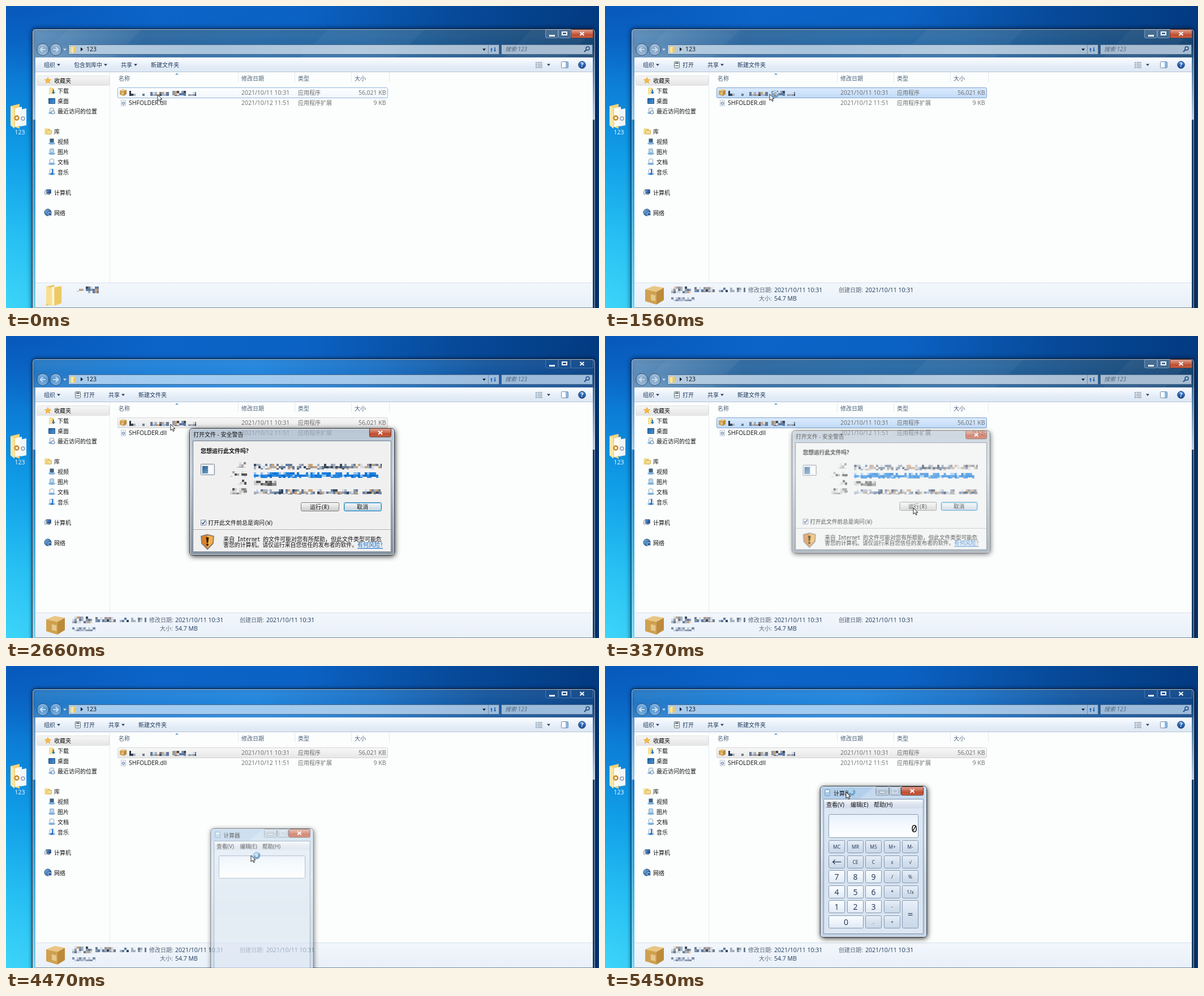
An HTML page with a canvas for the animation above (5520 ms loop, 1048 by 534 pixels).

```html
<!DOCTYPE html>
<html lang="zh">
<head>
<meta charset="utf-8">
<style>
html, body { margin: 0; width: 100%; height: 100%; overflow: hidden; }
canvas { display: block; }
</style>
</head>
<body>
<canvas id="stage" width="1048" height="534"></canvas>
<script>
const LOOP = 5520;
const stage = document.getElementById('stage').getContext('2d');
let g = stage;

const clamp = v => Math.max(0, Math.min(1, v));
const ramp = (t, a, b) => clamp((t - a) / (b - a));
const ease = p => p * p * (3 - 2 * p);
const noise = n => { const v = Math.sin(n * 127.1) * 43758.5453; return v - Math.floor(v); };

// ---- drawing helpers ----
function grad(x0, y0, x1, y1, ...colors) {
  const lg = g.createLinearGradient(x0, y0, x1, y1);
  colors.forEach((c, i) => lg.addColorStop(i / (colors.length - 1), c));
  return lg;
}
const down = (y, h, ...colors) => grad(0, y, 0, y + h, ...colors);

function rect(x, y, w, h, fill) { g.fillStyle = fill; g.fillRect(x, y, w, h); }

function box(x, y, w, h, r, fill, line) {
  g.beginPath();
  g.roundRect(x + .5, y + .5, w - 1, h - 1, r);
  if (fill) { g.fillStyle = fill; g.fill(); }
  if (line) { g.strokeStyle = line; g.lineWidth = 1; g.stroke(); }
}

function poly(points, fill, line, width = 1) {
  g.beginPath();
  for (let i = 0; i < points.length; i += 2) g.lineTo(points[i], points[i + 1]);
  if (fill) { g.closePath(); g.fillStyle = fill; g.fill(); }
  if (line) { g.strokeStyle = line; g.lineWidth = width; g.stroke(); }
}

function disc(x, y, r, fill, line, width = 1) {
  g.beginPath();
  g.arc(x, y, r, 0, 7);
  if (fill) { g.fillStyle = fill; g.fill(); }
  if (line) { g.strokeStyle = line; g.lineWidth = width; g.stroke(); }
}

const SANS = "'Open Sans','Noto Sans CJK SC',sans-serif";
const MONO = "'Noto Sans Mono CJK SC','Noto Sans CJK SC',monospace";
function text(s, x, y, color = '#111', { size, style = '', family = SANS, align = 'left' } = {}) {
  size ??= /[\u4e00-\u9fff]/.test(s) ? 10 : 10.5;
  g.font = `${style} ${size}px ${family}`;
  g.textAlign = align;
  g.fillStyle = color;
  g.fillText(s, x, y);
}

const INK = ['#39485c', '#6d7b8e', '#a5b2c1', '#c9a27c', '#5f7ba4', '#d5dbe2', '#8f98a6'];
const BLUES = ['#0a6fd0', '#1b7fdc', '#2f8ae0', '#8cc0f0'];
const GRAYS = ['#555', '#888', '#aaa', '#ccc', '#ddd'];
// Pixelated words: the middle rows are denser than the outer ones.
function mosaic(x, y, w, h, seed, colors = INK, fill = .75) {
  for (let j = 0; j < h; j += 4) {
    const density = j > 0 && j + 4 < h ? Math.min(1, fill * 1.3) : fill * .85;
    for (let i = 0; i < w; i += 4) {
      const n = seed + i * 3.7 + j * 11.3;
      if (noise(n) < density)
        rect(x + i, y + j, Math.min(4, w - i), Math.min(4, h - j), colors[Math.floor(noise(n + .5) * colors.length)]);
    }
  }
}

const triangle = (x, y, c = '#1e395b') => poly([x - 3, y - 1.5, x + 3, y - 1.5, x, y + 2], c);

// ---- icons ----
function folder(x, y, w, h) {
  poly([x, y + h * .08, x + w * .45, y, x + w * .5, y + h * .9, x, y + h], '#e9c766');
  poly([x + w * .3, y + h * .1, x + w * .8, y + h * .06, x + w * .8, y + h * .9, x + w * .3, y + h], '#fff4cf');
  poly([x + w * .45, y + h * .12, x + w * .85, y + h * .06, x + w * .85, y + h * .88, x + w * .45, y + h], '#edc965');
  poly([x, y + h * .08, x + w * .3, y + h * .14, x + w * .33, y + h, x, y + h * .9], '#f8df93');
}

function carton(x, y, s) {
  poly([x, y + s * .18, x + s * .45, y, x + s, y + s * .1, x + s * .6, y + s * .32], '#e9c684');
  poly([x, y + s * .18, x + s * .6, y + s * .32, x + s * .6, y + s, x, y + s * .82], '#cfa04e');
  poly([x + s * .6, y + s * .32, x + s, y + s * .1, x + s, y + s * .76, x + s * .6, y + s], '#bd8a3a');
  poly([x + s * .3, y + s * .45, x + s * .55, y + s * .5, x + s * .55, y + s * .82, x + s * .3, y + s * .76], '#e6c98c');
}

function star(x, y, r) {
  const p = [];
  for (let i = 0; i < 10; i++) {
    const a = i * Math.PI / 5 - Math.PI / 2, d = i % 2 ? r * .45 : r;
    p.push(x + d * Math.cos(a), y + d * Math.sin(a));
  }
  poly(p, '#f6b93f', '#e09a2a', .6);
}

function monitor(x, y) {
  box(x + 2, y, 10, 8, 1, grad(x, y, x + 10, y + 8, '#7cc4f2', '#143d86'), '#5a6b80');
  rect(x + 5, y + 8, 5, 2, '#9aa6b4');
  box(x, y + 2, 4, 8, 1, '#dfe6ee', '#8794a4');
}

function media(x, y, color) {
  box(x + 2, y, 8, 8, 1, color, '#8fa2b6');
  g.beginPath();
  g.ellipse(x + 6, y + 9, 6, 2, 0, 0, 7);
  g.fillStyle = '#7fb2de';
  g.fill();
}

function arrow(x, y) {
  poly([x, y, x, y + 11, x + 2.6, y + 8.6, x + 4.6, y + 12.6, x + 6.3, y + 11.8, x + 4.5, y + 8, x + 8, y + 8, x, y], '#fff', '#222', 1);
}

function busyRing(x, y, t) {
  disc(x, y, 4.6, null, '#6fa3cc', 3.6);
  g.beginPath();
  const a = t / 1000 * 2 * Math.PI;
  g.arc(x, y, 4.6, a, a + 2.6);
  g.strokeStyle = '#c4e2f4';
  g.lineWidth = 2.4;
  g.stroke();
}

function closeButton(x, y, w, h, lit = true) {
  box(x, y, w, h, 2, lit ? down(y, h, '#dfa898', '#d07c66', '#bd4a2e', '#cc6e50') : null, lit ? '#63352e' : 'rgba(255,255,255,.22)');
  const cx = x + w / 2, cy = y + h / 2;
  for (const s of [-1, 1]) poly([cx - 3.5, cy - 3 * s, cx + 3.5, cy + 3 * s], null, '#fff', 2);
}

// ---- desktop and explorer ----
function desktop() {
  rect(0, 0, 1048, 534, grad(0, 0, 1048, 90, '#0757b8', '#0c64c8', '#0b62c4', '#074a9a', '#033a80'));
  const glow = g.createRadialGradient(-20, 570, 20, -20, 570, 590);
  ['#42d8fa', '#27c0f3', '#109ee8', '#0c7ad4', 'rgba(10,96,196,0)'].forEach((c, i) => glow.addColorStop(i / 4, c));
  rect(0, 0, 500, 534, glow);
  poly([8, 177, 24, 173, 24, 217, 8, 211], '#f3d27c');
  poly([16, 181, 28, 178, 28, 211, 16, 214], '#fbfaf4');
  poly([25, 183, 36, 181, 36, 211, 25, 213], '#f2f5f8');
  poly([8, 177, 14, 180, 15, 217, 8, 211], '#fae6a6');
  disc(19, 198, 3.5, null, '#c9882a', 2.5);
  disc(30, 199, 3, null, '#8a9bb0', 1.5);
  text('123', 24.5, 227, '#fff', { align: 'center' });
}

function windowFrame(active) {
  g.save();
  g.shadowColor = 'rgba(0,10,30,.7)';
  g.shadowBlur = active ? 9 : 6;
  box(46, 40, 996, 520, 6, active
    ? grad(46, 0, 1042, 0, '#5f8fbb', '#2d689f', '#2a6ba6', '#2566a0', '#1d5388', '#164573')
    : grad(46, 0, 1042, 0, '#2478c4', '#1f80d8', '#2285dc', '#1c72c6', '#14569e', '#104688'), '#10243c');
  g.restore();
  if (active) {
    g.save();
    g.beginPath();
    g.rect(47, 41, 994, 50);
    g.clip();
    for (const [x, w] of [[60, 130], [520, 170], [880, 110]])
      poly([x, 91, x + 50, 41, x + 50 + w, 41, x + w, 91], 'rgba(255,255,255,.04)');
    g.restore();
  }
  rect(47, 41, 994, 50, down(41, 50, 'rgba(255,255,255,.06)', 'rgba(255,255,255,0)', 'rgba(255,255,255,.1)'));
  rect(47, 91, 5, 110, down(91, 110, '#5c97cc', '#9cc6e8'));
  rect(47, 201, 5, 333, down(201, 333, '#1d79c2', '#3fa8dc', '#78d6f2'));
  rect(1037, 91, 4, 110, down(91, 110, '#3d6ea0', '#b9cde0'));
  rect(1037, 201, 4, 333, '#153f6a');
  box(47, 41, 994, 520, 5, null, 'rgba(255,255,255,.55)');

  for (const [x, w] of [[953, 23], [976, 22]])
    box(x, 41, w, 16, 2, active ? 'rgba(255,255,255,.13)' : null, `rgba(220,235,250,${active ? .4 : .22})`);
  rect(960, 51, 10, 3, '#fff');
  g.strokeStyle = '#fff';
  g.lineWidth = 2;
  g.strokeRect(983, 46, 8, 5);
  closeButton(998, 41, 40, 16, active);

  for (const x of [65, 88]) {
    disc(x, 77, 10.5, down(66, 21, 'rgba(255,255,255,.5)', 'rgba(255,255,255,.18)', 'rgba(255,255,255,.35)'), 'rgba(20,50,90,.7)');
    const d = x < 70 ? -1 : 1;
    poly([x - 5 * d, 77, x + 4 * d, 77], null, '#c9dcee', 2);
    poly([x, 73, x + 4.5 * d, 77, x, 81], null, '#c9dcee', 2);
  }
  triangle(104, 77, '#cfe0ef');
  const bar = active ? ['#b4cbe0', '#a9c4dc', '#b5cbdf', '#a8bdd2'] : ['#a6cbee', '#a2ccf2', '#a5c9ea', '#9dbcdc'];
  box(110, 68, 762, 18, 1, grad(110, 0, 872, 0, ...bar), '#47698c');
  box(875, 68, 162, 18, 1, active ? '#a8bdd2' : '#9dbcdc', '#47698c');
  rect(852, 69, 1, 16, '#6f8fae');
  folder(114, 71, 11, 12);
  poly([132, 73, 136, 76.5, 132, 80], '#111');
  text('123', 142, 80);
  triangle(845, 77, '#111');
  poly([856, 77, 858, 74, 860, 77], '#1a5fae');
  poly([858, 75, 858, 81], null, '#1a5fae', 1.5);
  poly([862, 78, 864, 81, 866, 78], '#1a5fae');
  poly([864, 73, 864, 79], null, '#1a5fae', 1.5);
  text('搜索 123', 882, 80, '#53677c', { style: 'italic' });
  disc(1028, 75, 3, null, '#204a82', 1.4);
  poly([1026, 77, 1022, 81], null, '#204a82', 2);
}

function toolbar(selected) {
  rect(52, 91, 985, 26, down(91, 26, '#fdfeff', '#eef4fb', '#e2ebf6', '#dde8f4'));
  rect(52, 116, 985, 1, '#b4c3d5');
  const item = (s, x, arrowX) => { text(s, x, 108, '#1e395b'); if (arrowX) triangle(arrowX, 104); };
  item('组织', 67, 93);
  if (selected) {
    box(122, 98, 10, 12, 1, '#fff', '#566');
    rect(124, 100, 6, 2, '#456');
    rect(124, 104, 6, 3, '#9ab');
    item('打开', 137);
    item('共享', 181, 207);
    item('新建文件夹', 234);
  } else {
    item('包含到库中', 120, 176);
    item('共享', 203, 229);
    item('新建文件夹', 256);
  }
  for (let i = 0; i < 4; i++) {
    rect(936, 99 + i * 3, 2, 2, '#7f9dba');
    rect(939, 99 + i * 3, 9, 1.5, '#98a4b2');
  }
  triangle(959, 104);
  box(981, 98, 13, 12, 1, '#fff', '#6d8cad');
  rect(989, 99, 4, 10, '#8db8e0');
  disc(1018, 104, 6.3, down(98, 12, '#4a8fd8', '#123f8c'), '#24487c');
  text('?', 1018, 108, '#fff', { style: 'bold', align: 'center' });
}

function navigation() {
  rect(183, 117, 1, 373, '#e3eaf2');
  box(54, 123, 129, 18, 2, down(123, 18, '#f7f7f7', '#e4e4e4'), '#e0e0e0');
  [['收藏夹', 85, 132], ['下载', 91, 150], ['桌面', 91, 168], ['最近访问的位置', 91, 186],
   ['库', 85, 222], ['视频', 91, 240], ['图片', 91, 258], ['文档', 91, 276], ['音乐', 91, 294],
   ['计算机', 85, 330], ['网络', 85, 366]].forEach(([s, x, y]) => text(s, x, y + 4));
  star(74, 132, 6);
  folder(76, 144, 10, 12);
  poly([81, 152, 87, 152, 84, 156], '#2678c8');
  rect(83, 148, 2, 4, '#2678c8');
  box(75, 163, 12, 10, 0, grad(75, 163, 87, 173, '#1d5ba8', '#4aa0dc'), '#2a4d78');
  media(75, 180, '#eef3f8');
  disc(83, 188, 3, '#e4edf5', '#6c88a8');
  folder(68, 216, 11, 11);
  box(71, 219, 10, 8, 1, '#f3dc92', '#d0a94c');
  media(75, 234, '#41637f');
  media(75, 252, '#b4d6ef');
  media(75, 270, '#fafcff');
  media(75, 288, '#fff');
  poly([82, 288, 82, 297, 79, 297], null, '#1a6cc4', 2);
  monitor(68, 324);
  disc(74, 365, 6, grad(68, 360, 80, 370, '#7fbcf0', '#16427f'), '#24466f');
  box(74, 365, 7, 6, 1, '#2f62a8', '#cfdbe8');
}

function fileList(row) {
  [['名称', 199], ['修改日期', 416], ['类型', 516], ['大小', 616]].forEach(([s, x]) => text(s, x, 132, '#4c607a'));
  for (const x of [410, 510, 610, 677]) rect(x, 117, 1, 18, '#e2e8f0');
  poly([299, 121.5, 302, 118.5, 305, 121.5], '#5f9ac8');
  const look = {
    hover: ['#fdfeff', '#f1f7fd', '#8fb6dc'],
    selected: ['#dcebfc', '#c0daf9', '#7da2ce'],
    idle: ['#f8f8f8', '#e6e6e6', '#d6d6d6']
  }[row];
  box(197, 144, 478, 19, 2, down(144, 19, look[0], look[1]), look[2]);
  carton(201, 147, 12);
  rect(218, 150, 3, 9, '#2a3848');
  mosaic(221, 155, 27, 4, 8, INK, .7);
  mosaic(255, 152, 33, 7, 21, INK, .9);
  mosaic(294, 150, 24, 9, 34, INK, .9);
  mosaic(322, 152, 14, 7, 55, INK, .9);
  box(203, 166, 9, 11, 0, '#fafcff', '#b9c4d0');
  disc(207.5, 172, 2, null, '#7a92b8', 1.5);
  text('SHFOLDER.dll', 217, 175);
  const gray = '#6d6d6d';
  [[157, '2021/10/11 10:31', '应用程序', '56,021 KB'], [175, '2021/10/12 11:51', '应用程序扩展', '9 KB']].forEach(([y, date, type, size]) => {
    text(date, 416, y, gray);
    text(type, 516, y, gray);
    text(size, 671.5, y, gray, { align: 'right' });
  });
}

function details(selected) {
  rect(52, 489, 985, 45, down(489, 45, '#f3f7fc', '#edf3fa', '#e9f0f8'));
  rect(52, 489, 985, 1, '#d5e0ec');
  rect(52, 533, 985, 1, '#6f8ba8');
  if (!selected) {
    folder(71, 493, 32, 37);
    mosaic(121, 500, 20, 5, 71, INK, .35);
    mosaic(141, 496, 23, 12, 12, INK, .75);
    return;
  }
  carton(71, 495, 33);
  mosaic(117, 496, 35, 12, 3, INK, .65);
  mosaic(158, 497, 36, 9, 43, INK, .75);
  mosaic(201, 498, 47, 8, 66, INK, .75);
  mosaic(117, 515, 41, 7, 91, ['#8f9db2', '#a9b5c8', '#7c8ca8', '#c2ccd9'], 1);
  const label = '#5a6779', value = '#1e395b';
  text('修改日期:', 253, 506, label);
  text('2021/10/11 10:31', 299, 506, value);
  text('创建日期:', 413, 506, label);
  text('2021/10/11 10:31', 460, 506, value);
  text('大小:', 272, 521, label);
  text('54.7 MB', 299, 521, value);
}

// ---- popup windows, painted once ----
const PAD = 14;
function layer(w, h, paint) {
  const c = document.createElement('canvas');
  c.width = w + 2 * PAD;
  c.height = h + 2 * PAD;
  g = c.getContext('2d');
  g.translate(PAD, PAD);
  paint(w, h);
  g = stage;
  return c;
}

function glass(w, h, ...colors) {
  g.save();
  g.beginPath();
  g.rect(-PAD, -PAD, w + 2 * PAD, h + 2 * PAD);
  g.roundRect(0, 0, w, h, 5);
  g.clip('evenodd');
  g.shadowColor = 'rgba(0,0,0,.85)';
  g.shadowBlur = 10;
  g.shadowOffsetX = 1;
  g.shadowOffsetY = 2;
  box(0, 0, w, h, 5, '#333');
  g.restore();
  box(0, 0, w, h, 5, down(0, h, ...colors), '#2b3440');
  box(1, 1, w - 2, h - 2, 4, null, 'rgba(255,255,255,.7)');
}

const dialog = layer(363, 225, (w, h) => {
  glass(w, h, 'rgba(160,176,194,.72)', 'rgba(178,194,212,.75)', 'rgba(150,164,180,.88)', 'rgba(122,136,152,.9)');
  g.translate(-324, -163);
  box(330, 185, 351, 197, 0, '#f0f0f0', '#6e7b88');
  text('打开文件 - 安全警告', 331, 178);
  closeButton(642, 163, 39, 16);
  text('您想运行此文件吗?', 344, 207, '#111', { style: 'bold' });
  box(344, 226, 25, 20, 1, '#e9eef4', '#7d8894');
  rect(347, 230, 10, 13, grad(347, 230, 357, 243, '#2d5f92', '#6aa0c4'));
  rect(358, 230, 8, 13, '#fafafa');
  [[408, 223, 16, 10], [396, 239, 30, 10], [405, 254, 21, 9], [396, 269, 30, 11]].forEach((b, i) => mosaic(...b, 15 + i * 9, GRAYS, .6));
  mosaic(438, 226, 226, 10, 17, INK, .6);
  mosaic(438, 241, 220, 10, 29, BLUES, .72);
  mosaic(438, 256, 40, 9, 50, GRAYS, 1);
  mosaic(438, 271, 226, 9, 61, INK, .65);
  box(521, 294, 68, 16, 2, down(294, 16, '#f4f4f4', '#ebebeb', '#d8d8d8', '#cfcfcf'), '#7c7c7c');
  box(597, 294, 67, 16, 2, down(294, 16, '#f3f6f9', '#e8edf2', '#d2dce4', '#cdd6de'), '#3c7fb1');
  box(598, 295, 65, 14, 1, null, '#74c5ec');
  const mono = { family: MONO, size: 10 };
  text('运行(R)', 537, 306, '#111', mono);
  text('取消', 620, 306, '#111', mono);
  box(344, 325, 10, 10, 0, '#fff', '#7a8590');
  poly([346, 330, 348, 332.5, 352, 327], null, '#2a4a8a', 1.6);
  text('打开此文件前总是询问(W)', 357, 333.5, '#111', mono);
  rect(331, 342, 349, 1, '#a9a9a9');
  rect(331, 343, 349, 1, '#fff');
  poly([345, 354, 356, 351, 367, 354, 366, 367, 356, 377, 346, 367], '#d9822a', '#777c84', 1.6);
  poly([356, 352, 366, 355, 365, 366, 356, 375], '#f0b04a');
  poly([353.5, 356, 358.5, 356, 357, 366, 355, 366], '#2a1a08');
  disc(356, 369, 2, '#2a1a08');
  text('来自 Internet 的文件可能对您有所帮助，但此文件类型可能危', 384, 363, '#111', mono);
  text('害您的计算机。请仅运行来自您信任的发布者的软件。', 384, 373, '#111', { family: MONO, size: 9.9 });
  text('有何风险?', 621, 373, '#0066cc', mono);
  rect(621, 375, 45, 1, '#0066cc');
});

const paintCalculator = ready => (w, h) => {
  glass(w, h, '#c3d8ee', '#d5e3f1', '#bfd0e2', '#c4d4e6');
  poly([2, 2, 95, 2, 70, 23, 2, 23], 'rgba(120,170,220,.22)');
  g.translate(-380, -212);
  box(388, 218, 10, 12, 1, '#a9cbe6', '#7f9fbd');
  rect(390, 220, 6, 3, '#eef6fc');
  text('计算器', 404, 228.5);
  for (const [x, cw] of [[478, 24], [502, 21]])
    box(x, 213, cw, 16, 2, down(213, 16, '#d6e1ed', '#b3c5d8', '#c3d2e2'), '#8797a9');
  box(484, 221, 12, 4, 0, '#fff', '#7d8ea0');
  box(508, 217, 9, 8, 0, null, '#e3ebf3');
  closeButton(523, 213, 40, 16);
  box(386, 235, 177, 239, 0, down(235, 239, '#dfe9f5', '#d6e2f0', '#dce6f2'), '#7d93ab');
  rect(387, 236, 175, 16, down(236, 16, '#f8fafd', '#dde4f0', '#d4dcea'));
  ['查看(V)', '编辑(E)', '帮助(H)'].forEach((s, i) => text(s, [391, 434, 475][i], 248.5));
  box(395, 262, 159, 42, 2, down(262, 42, '#e7f0fb', '#f6fafe', '#fff'), '#8a9cb2');
  if (!ready) return;
  text('0', 552, 294, '#111', { size: 18, family: "'Noto Sans Mono',monospace", align: 'right' });
  const rows = ['MC MR MS M+ M-', '← CE C ± √', '7 8 9 / %', '4 5 6 * 1/x', '1 2 3 - =', '0 . +'];
  rows.forEach((row, r) => row.split(' ').forEach((key, i) => {
    const digit = /^\d$/.test(key), wide = key === '0', tall = key === '=';
    const col = r === 5 && i ? i + 1 : i;
    const x = 395 + Math.round(col * 32.5), y = 308 + Math.round(r * 26.6);
    const kw = wide ? 62 : 29, kh = tall ? 50 : 23;
    box(x, y, kw, kh, 2, digit ? down(y, kh, '#fbfdff', '#eef4fb', '#dfe8f3') : down(y, kh, '#e9f0f8', '#d6e1ee', '#c9d7e7'), '#8499b1');
    const size = tall ? 17 : digit ? 14 : key === '←' ? 17 : 8.5;
    text(key, x + kw / 2, y + kh / 2 + size * .36, '#1e3050', { size, align: 'center' });
  }));
};
const calculatorShell = layer(189, 268, paintCalculator(false));
const calculator = layer(189, 268, paintCalculator(true));

function popup(image, x, y, px, py, p) {
  const s = .926 + .074 * p;
  g.save();
  g.globalAlpha = p < 1 ? .3 + .7 * p : 1;
  g.translate(x + px, y + py);
  g.scale(s, s);
  g.drawImage(image, -px - PAD, -py - PAD);
  g.restore();
}

// ---- motion ----
const POINTER = [[90, 268, 157], [330, 291, 156], [2700, 291, 156], [3160, 545, 304], [3900, 545, 304],
  [4450, 433, 335], [4620, 433, 335], [4960, 404, 294], [5000, 404, 294], [5450, 426, 223]];

function pointerAt(t) {
  let i = 0;
  while (i < POINTER.length - 2 && t >= POINTER[i + 1][0]) i++;
  const [t0, x0, y0] = POINTER[i], [t1, x1, y1] = POINTER[i + 1];
  const p = ease(ramp(t, t0, t1));
  return [x0 + (x1 - x0) * p, y0 + (y1 - y0) * p];
}

function draw(t) {
  const active = t < 2450 || (t >= 3300 && t < 4400);
  desktop();
  windowFrame(active);
  rect(52, 91, 985, 443, '#fcfefd');
  toolbar(t >= 660);
  navigation();
  fileList(t < 590 ? 'hover' : active ? 'selected' : 'idle');
  details(t >= 725);

  if (t >= 2450 && t < 3450) popup(dialog, 324, 163, 181, 112, Math.min(ramp(t, 2450, 2600), 1 - ramp(t, 3300, 3450)));
  if (t >= 4400) {
    const drag = ease(ramp(t, 5000, 5450));
    popup(t < 4540 ? calculatorShell : calculator, 358 + 22 * drag, 284 - 72 * drag, 94, 81, ramp(t, 4400, 4540));
  }

  const [x, y] = pointerAt(t);
  if ((t >= 930 && t < 2100) || t >= 3400) busyRing(x + 10, y, t);
  arrow(x, y);
}

function tick() {
  draw(performance.now() % LOOP);
  requestAnimationFrame(tick);
}
tick();
</script>
</body>
</html>
```
